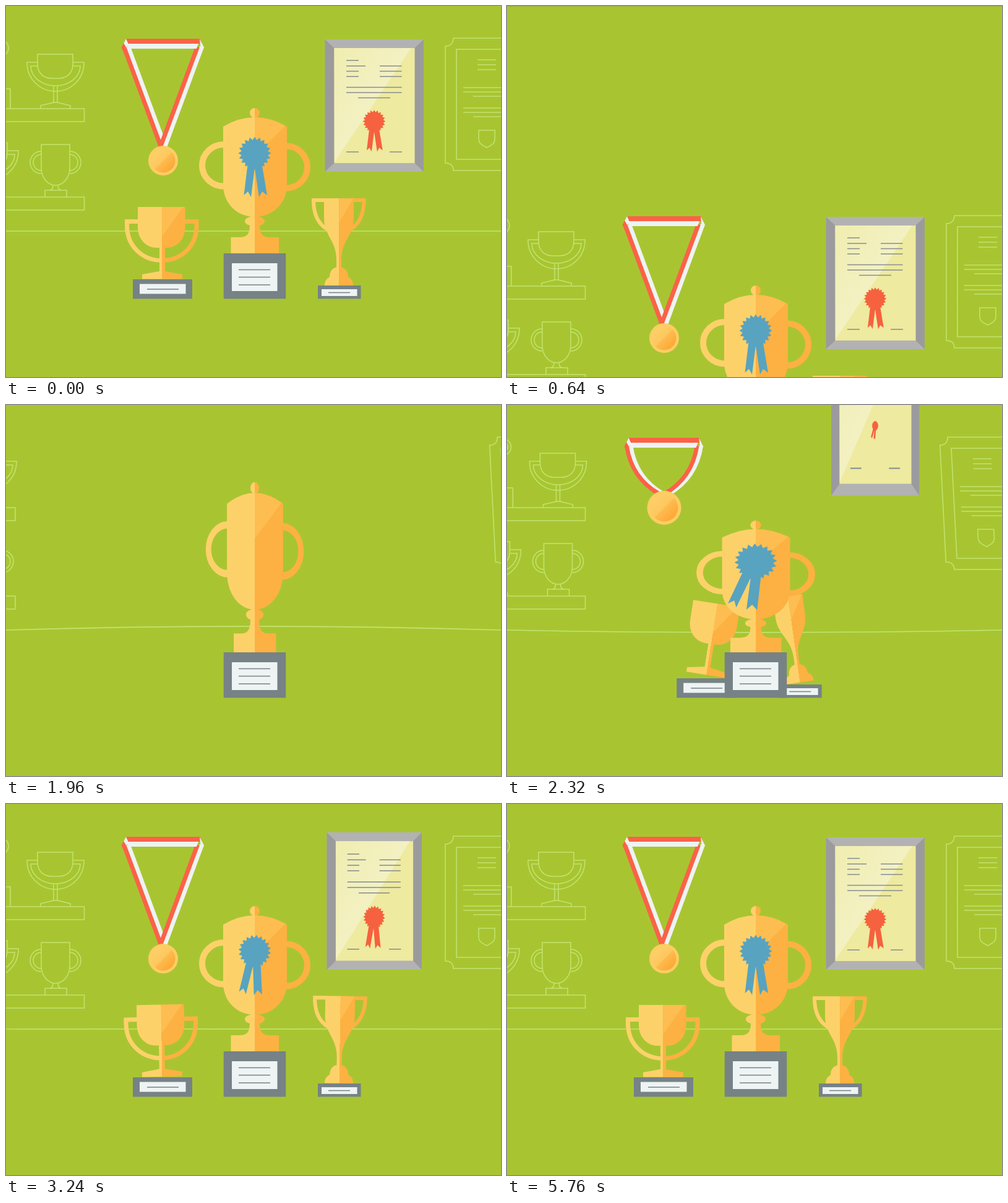
Animation, 800 px wide and 600 px high, one loop 5800 ms. Source, as an HTML page with a canvas:

```html
<!DOCTYPE html>
<html lang="en">
<head>
<meta charset="utf-8">
<title>Trophy shelf</title>
<style>
html, body { margin: 0; width: 100%; height: 100%; overflow: hidden; background: #a8c531; }
canvas { display: block; width: 800px; height: 600px; }
</style>
</head>
<body>
<canvas id="stage" width="800" height="600"></canvas>
<script>
const c = document.getElementById('stage').getContext('2d');
const LOOP = 5800, STEP = 40, REST = 5800;
const BG = '#a8c531', WALL = '#c3e46f', SLATE = '#768286', PAPER = '#eef3f3';
const GOLD = '#fdd16a', AMBER = '#fdb143', SHINE = '#fdbd51';
const RED = '#fb6247', BLUE = '#58a3c0';

// Timing helpers
const prog = (t, a, b) => Math.min(1, Math.max(0, (t - a) / (b - a)));
const inOut = x => x < .5 ? 4 * x ** 3 : 1 - 4 * (1 - x) ** 3;
const outBack = x => 1 + 2.2 * (x - 1) ** 3 + 1.2 * (x - 1) ** 2;
const mix = (a, b, k) => a + (b - a) * k;
const swing = (u, period, tau) => Math.exp(-u / tau) * Math.cos(2 * Math.PI * u / period);
const spring = (t, start, period, tau) => t < start ? 0 : 1 - swing(t - start, period, tau);
const rad = d => d * Math.PI / 180;

function bezier(x, a, b) {
  let lo = 0, hi = 1, s = .5;
  for (let i = 0; i < 24; i++) {
    s = (lo + hi) / 2;
    const at = 3 * a * s * (1 - s) ** 2 + 3 * b * s * s * (1 - s) + s ** 3;
    if (at < x) lo = s; else hi = s;
  }
  return 3 * s * s - 2 * s ** 3;
}

// Drawing helpers
const rect = (x, y, w, h, color) => { c.fillStyle = color; c.fillRect(x, y, w, h); };
const fill = (path, color) => { c.fillStyle = color; c.fill(new Path2D(path)); };
function stroke(path, color, width) {
  c.strokeStyle = color;
  c.lineWidth = width;
  c.stroke(new Path2D(path));
}
function disc(x, y, r, color) {
  c.fillStyle = color;
  c.beginPath();
  c.arc(x, y, Math.max(0, r), 0, 7);
  c.fill();
}
function rule(x1, x2, y, color, width) { rect(x1, y - width / 2, x2 - x1, width, color); }
function group(draw) { c.save(); draw(); c.restore(); }
function scaleAt(x, y, sx, sy) { c.translate(x, y); c.scale(sx, sy); c.translate(-x, -y); }
function rotateAt(x, y, deg) { c.translate(x, y); c.rotate(rad(deg)); c.translate(-x, -y); }

function twoTone(cx) {
  const g = c.createLinearGradient(0, 0, 2 * cx, 0);
  g.addColorStop(0, GOLD);
  g.addColorStop(.5, GOLD);
  g.addColorStop(.5, AMBER);
  g.addColorStop(1, AMBER);
  return g;
}
function shinyBody(path, tone, shine) {
  fill(path, tone);
  group(() => { c.clip(new Path2D(path)); fill(shine, SHINE); });
}

// Outlined objects on the wall
const BOWL = 'M51 78H108V94C108 109 98 117 85 117H74C61 117 51 109 51 94Z' +
  'M51 91H34V92A46 46 0 0 0 126 92V91H108' +
  'M51 97H40A40 32 0 0 0 120 97H108' +
  'M77 129V156M83 129V156M56 166V161L77 156H83L104 161V166';
const CUP = 'M57 224H103V262C103 278 92 290 80 290S57 278 57 262Z' +
  'M57 235A18 18 0 0 0 57 271M57 240A13 13 0 0 0 57 266' +
  'M103 235A18 18 0 0 1 103 271M103 240A13 13 0 0 1 103 266' +
  'M76 290C76 294 75 298 70 298M84 290C84 294 85 298 90 298M63 309V298H98V309';

function wall(t) {
  const slide = 1 - inOut(prog(t, 1760, 2260));
  const lag = t >= 3640 ? 0 : swing(Math.max(0, t - 2320), 520, 280) * (1 - prog(t, 3240, 3620));
  group(() => {
    c.translate(-150 * slide, 0);
    stroke('M-5 166H126.5V187H-5M-5 309H126.5V330H-5', WALL, 1.5);
    c.translate(2.5 * lag, 0);
    stroke(BOWL, WALL, 1.5);
    stroke(CUP, WALL, 1.5);
    stroke('M-10 54A14 14 0 0 1 -10 82M-10 59A9 9 0 0 1 -10 77M-5 134H7V166', WALL, 1.5);
    c.translate(-106, 143);
    stroke(BOWL, WALL, 1.5);
  });
  group(() => {
    c.translate(110 * slide, 0);
    c.transform(1, 0, .051 * lag, 1, -.051 * lag * 266, 0);
    stroke('M850 52H723C723 60 718 65 710 65V254C718 254 723 258 723 266H850' +
      'M850 70H728V248H850M762 87H792M762 95H792M762 103H792' +
      'M739 132H850M739 139H850M755 146H850M739 165H850M739 172H850M755 179H850' +
      'M764 201H790V215C790 224 782 226 777 229C772 226 764 224 764 215Z', WALL, 1.5);
  });
}

function floor(t) {
  const half = 400 * inOut(prog(t, 1320, 1470));
  if (!half) return;
  const edge = 364 + 160 * (1 - inOut(prog(t, 1440, 1900)));
  const still = 1 - prog(t, 3000, 3600);
  const bow = -35 * swing(Math.max(0, t - 1480), 560, 380) * still;
  group(() => {
    c.beginPath();
    c.rect(400 - half, 0, 2 * half, 600);
    c.clip();
    stroke(`M0 ${edge}Q400 ${edge + 2 * bow} 800 ${edge}`, WALL, 1.6);
  });
}

function rosette(x, y, size, deg, color) {
  if (size <= 0) return;
  group(() => {
    c.translate(x, y);
    c.rotate(rad(deg));
    c.scale(size, size);
    fill('M-11 14L-17.5 68L-11 62L-6 71L0 24L7 71L12 62L20 68L11 14Z', color);
    c.beginPath();
    for (let i = 0; i < 40; i++) {
      const r = i % 2 ? 21.5 : 26.5, a = i * Math.PI / 20;
      c.lineTo(r * Math.sin(a), -r * Math.cos(a));
    }
    c.fill();
  });
}

function medal(t) {
  if (t < 2080) return;
  const bar = outBack(prog(t, 2080, 2280)) * (1 - .045 * Math.exp(-Math.max(0, t - 2320) / 150));
  const drop = spring(t, 2250, 586, 140);
  const slack = Math.max(0, 1 - drop), y = mix(61, 250, drop);
  const band = (x1, x2, side, color) => {
    const y1 = 66, y2 = y - 22, end = x2 + side * 10 * slack;
    const mx = (x1 + end) / 2 + side * 44 * slack, my = (y1 + y2) / 2 + 30 * slack;
    stroke(`M${x1} ${y1}Q${mx} ${my} ${end} ${y2}`, color, 7);
  };
  group(() => {
    scaleAt(254, 61, Math.max(.001, bar), 1);
    if (drop > .1) {
      band(197.5, 257.5, -1, PAPER);
      band(190.5, 250.5, -1, RED);
      band(316.5, 256.5, 1, PAPER);
      band(309.5, 249.5, 1, RED);
    }
    fill('M194 61H311L308 69H198Z', PAPER);
    fill('M194 53H314L317 61H196Z', RED);
    fill('M194 53L198 62L193 70L187 67Z', PAPER);
    fill('M186.500 67L190 60L195 68L190 74Z', RED);
    fill('M313 53L320 67L317 73L314 63Z', PAPER);
  });
  const grow = (1 + .33 * slack) * prog(t, 2100, 2260);
  group(() => {
    c.translate(254, y);
    c.scale(grow, grow);
    disc(0, 0, 24, '#fdcd64');
    const g = c.createLinearGradient(-13, -13, 13, 13);
    g.addColorStop(0, '#fdcf68');
    g.addColorStop(.5, '#fdc75d');
    g.addColorStop(.5, '#fdbc50');
    g.addColorStop(1, '#fda936');
    disc(0, 0, 19.5, g);
  });
}

function certificate(t) {
  if (t < 2180) return;
  const u = Math.max(0, t - 2320), still = 1 - prog(t, 3240, 3620);
  const bottom = mix(-40, 268, inOut(prog(t, 2180, 2440)));
  const sx = 1 - .107 * swing(u, 460, 880) * still;
  const sy = 1 + .39 * swing(u, 460, 400) * still;
  group(() => {
    c.translate(595, bottom);
    c.scale(sx, sy);
    c.translate(-595, -268);
    rect(515.5, 54, 159.5, 214, '#b2b2b2');
    fill('M515.5 54L530.5 68V254L515.5 268ZM675 54L660.5 68V254L675 268Z', '#9b9b9d');
    rect(530.5, 68, 130, 186, '#eeea9f');
    const g = c.createLinearGradient(530, 68, 615, 126);
    g.addColorStop(0, '#f0edb0');
    g.addColorStop(1, '#f3f1c2');
    fill('M530.5 68H655L531 252Z', g);
    const ink = (x1, x2, ...ys) => ys.forEach(y => rule(x1, x2, y, '#868d93', 1.5));
    ink(550, 570, 88, 105.5, 114, 236);
    ink(550, 581, 97);
    ink(604, 639.5, 97, 105.5, 114);
    ink(550, 639.5, 131.5, 140);
    ink(569, 621, 148.5);
    ink(620, 640, 236);
    const tilt = 16 * swing(u, 1080, 900) * (1 - prog(t, 5300, REST));
    rosette(595, 186.5, .69 * spring(t, 2290, 320, 140), tilt, '#f6613f');
  });
}

function plinth(x, y, w, h, px, py, pw, ph) {
  rect(x, y, w, h, SLATE);
  rect(px, py, pw, ph, PAPER);
}

// Lean pivots on the base corner that stays down
function lean(t, size) {
  const still = 1 - prog(t, 3240, 3600);
  return t < 2320 ? size * inOut(prog(t, 2140, 2320)) : size * swing(t - 2320, 613, 420) * still;
}

function leftCup(t) {
  const shift = 149 * (1 - inOut(prog(t, 2110, 2520)));
  const deg = lean(t, 9), arms = outBack(prog(t, 2380, 2680)), tone = twoTone(252.5);
  group(() => {
    c.translate(shift, 0);
    group(() => {
      rotateAt(deg > 0 ? 285 : 220, 441, deg);
      if (arms > 0) group(() => {
        scaleAt(252, 391, arms, arms);
        stroke('M214 348.500H195.500V355C195.500 388 220 411.500 252 411.500S308 388 308 355V348.500H288', tone, 7);
      });
      shinyBody('M213 325H289.500V357C289.500 378 276 391 259 391H244C227 391 213 378 213 357Z',
        tone, 'M252.500 320H290L252.500 372Z');
      fill('M248 388H257V429L285 434V441.500H220V434L248 429Z', tone);
    });
    plinth(205, 442, 96, 31.5, 216, 449.5, 74.5, 16);
    rule(228, 279, 458, SLATE, 1.5);
  });
}

function rightCup(t) {
  const shift = -121 * (1 - inOut(prog(t, 2120, 2530)));
  const deg = lean(t, -8), arms = outBack(prog(t, 2380, 2680)), tone = twoTone(538.5);
  group(() => {
    c.translate(shift, 0);
    group(() => {
      rotateAt(deg > 0 ? 561 : 515, 452, deg);
      if (arms > 0) group(() => {
        scaleAt(538, 345, arms, arms);
        stroke('M515 314H497C497 337 504 352 519 361M561 314H578.500C578.500 337 571 352 557 361', tone, 6);
      });
      shinyBody('M514 311H562V345C561 372 542 380 542 410V425H534V410C534 380 515 372 514 345Z',
        tone, 'M538.500 308H563L538.500 350Z');
      fill('M515 452C515 442 521 440 523 438C523 426 531 422 538 422S553 426 553 438C556 440 561 442 561 452Z', tone);
    });
    plinth(504, 452, 69.5, 21.5, 510, 458, 57.5, 11);
    rule(521, 556, 463.5, SLATE, 1.5);
  });
}

function mainCup(t) {
  const sy = spring(t, 1800, 520, 220);
  if (sy <= 0) return;
  const sx = (1 + Math.min(.2, .7 * (1 - sy))) * prog(t, 1780, 1920);
  const tilt = 15 * swing(Math.max(0, t - 2320), 960, 1200) * (1 - prog(t, 5300, REST));
  const tone = twoTone(402);
  group(() => {
    scaleAt(402, 400, sx, sy);
    stroke('M352 224A35 33.750 0 0 0 352 291.500', GOLD, 10);
    stroke('M453 226.500A34 34 0 0 1 453 294.500', AMBER, 10);
    disc(402, 173, 8, tone);
    fill('M399 178H405V184H399Z', tone);
    shinyBody('M351 195Q376 180 402 180T454 195V289C454 320 430 341 402 341S351 320 351 289Z',
      tone, 'M402 175H455V190L402 243Z');
    fill('M394 350H410V354C410 368 414 374 426 374H441V400H363.500V374H378C390 374 394 368 394 354Z', tone);
    c.fillStyle = tone;
    c.beginPath();
    c.ellipse(402, 348, 16, 8, 0, 0, 7);
    c.fill();
    rosette(402, 238, spring(t, 2160, 320, 106), tilt, BLUE);
  });
}

function mainPlinth(t) {
  const k = inOut(prog(t, 1480, 1780)), pop = outBack(prog(t, 1200, 1420));
  const w = mix(140, 100.5, k) * pop, h = mix(140, 73.5, k) * pop;
  c.fillStyle = SLATE;
  c.beginPath();
  c.roundRect(mix(397, 402, k) - w / 2, mix(270, 436.7, k) - h / 2, w, h, Math.max(0, 70 * pop * (1 - k)));
  c.fill();
  const label = inOut(prog(t, 1760, 1960));
  if (label) group(() => {
    scaleAt(402, 438.5, label, label);
    rect(365, 416, 73.5, 45, PAPER);
    [426.5, 438.5, 451].forEach(y => rule(376, 427, y, SLATE, 1.5));
  });
  const fly = inOut(prog(t, 1400, 1780));
  if (fly < 1) disc(mix(403, 595, fly), mix(273, -120, fly), 70 * pop, '#9c9c9d');
}

function scene(t) {
  wall(t);
  floor(t);
  medal(t);
  certificate(t);
  if (t > 2100) { leftCup(t); rightCup(t); }
  mainCup(t);
  mainPlinth(t);
}

function frame() {
  // The picture holds for one step; a small lead absorbs clock jitter
  const t = Math.floor((performance.now() + 8) % LOOP / STEP) * STEP;
  rect(0, 0, 800, 600, BG);
  if (t < 1220) {
    group(() => {
      c.translate(0, 600 * bezier(prog(t, 0, 1200), .86, .24));
      scene(REST);
    });
    if (t >= STEP) rect(0, 0, 800, 1, '#98b038');
  } else {
    scene(t);
  }
  requestAnimationFrame(frame);
}
frame();
</script>
</body>
</html>
```
